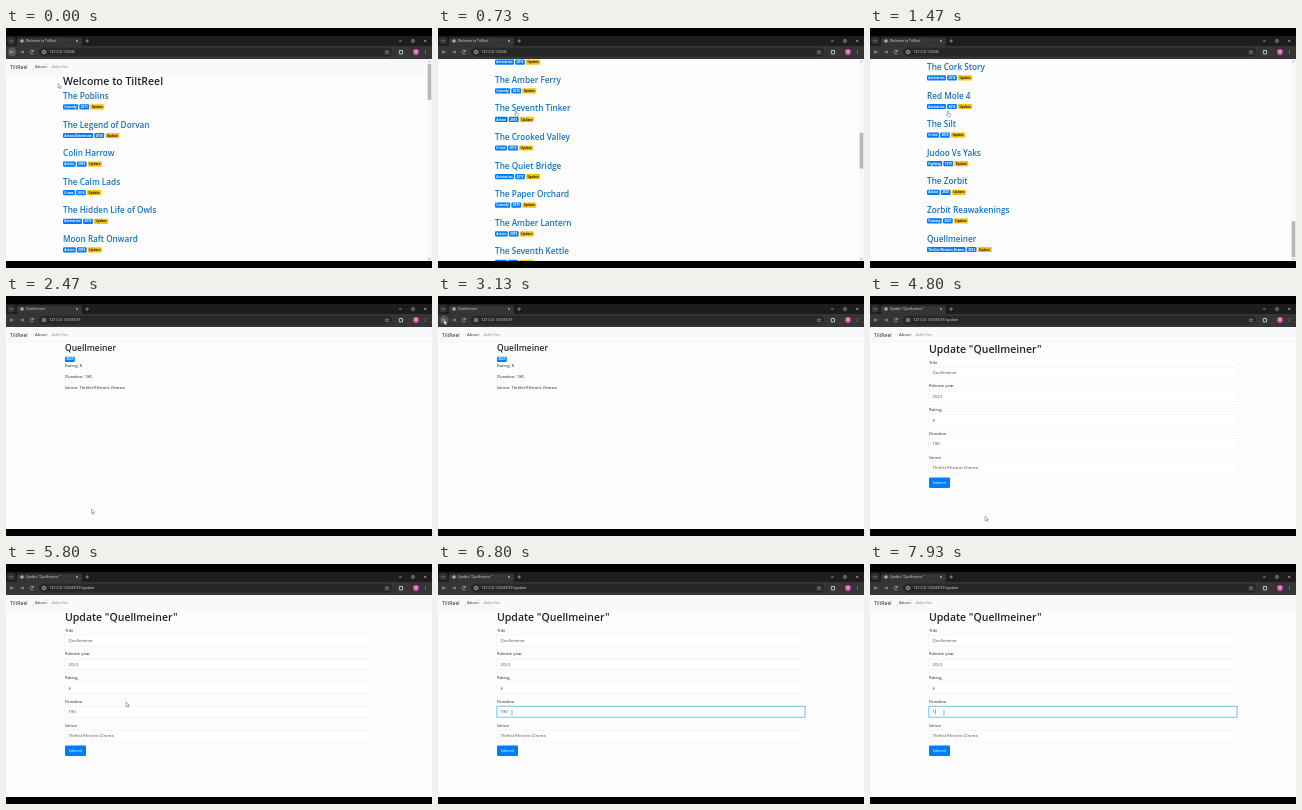
An HTML page with a canvas for the animation above (8000 ms loop, 426x240 px).

```html
<!DOCTYPE html>
<html lang="en">
<head>
<meta charset="utf-8">
<title>Film list</title>
<style>
  html, body { margin: 0; width: 100%; height: 100%; overflow: hidden; background: #000; }
  canvas { display: block; width: 426px; height: 240px; }
</style>
</head>
<body>
<canvas id="stage"></canvas>
<script>
const W = 426, H = 240, LOOP = 8000;
const PAGE_TOP = 31, PAGE_BOTTOM = 233, PITCH = 28.6;
const INK = '#212529', BLUE = '#007bff', LINK = '#1273c4', YELLOW = '#ffc107';
const FONT = '"Open Sans", "Noto Sans", sans-serif';
const SITE = 'TiltReel', FILM = 'Quellmeiner';

const canvas = document.getElementById('stage');
const ctx = canvas.getContext('2d');
const ratio = window.devicePixelRatio || 1;
canvas.width = W * ratio;
canvas.height = H * ratio;

const firstFilms = [
  ['The Poblins', 'Comedy', 2011],
  ['The Legend of Dorvan', 'Action/Adventure', 2016],
  ['Colin Harrow', 'Action', 2016],
  ['The Calm Lads', 'Crime', 2016],
  ['The Hidden Life of Owls', 'Animation', 2016],
  ['Moon Raft Onward', 'Action', 2016]
];
const lastFilms = [
  ['The Cork Story', 'Animation', 2014],
  ['Red Mole 4', 'Animation', 2014],
  ['The Silt', 'Crime', 2014],
  ['Judoo Vs Yaks', 'Fighting', 1979],
  ['The Zorbit', 'Action', 2021],
  ['Zorbit Reawakenings', 'Fantasy', 2021],
  [FILM, 'Thriller/Historic Drama', 2023]
];
const adjectives = ['Quiet', 'Amber', 'Crooked', 'Paper', 'Seventh'];
const nouns = ['Ferry', 'Orchard', 'Tinker', 'Lantern', 'Valley', 'Kettle', 'Bridge'];
const genres = ['Action', 'Comedy', 'Animation', 'Crime'];
const middleFilms = Array.from({ length: 24 }, (_, i) => [
  `The ${adjectives[i * 3 % 5]} ${nouns[i * 2 % 7]}`, genres[i * 7 % 4], 2016 - (i >> 3)
]);
const films = [...firstFilms, ...middleFilms, ...lastFilms];
const MAX_SCROLL = 68 + PITCH * (films.length - 1) - 210.6;

// Cursor stops: time, x, y
const cursorPath = [
  [0, 52, 55.5], [250, 52, 55.5], [700, 77, 83], [1550, 77, 83], [2150, 85.5, 213],
  [2650, 85.5, 213], [3050, 6, 24], [3250, 6, 24], [3750, 94, 140], [3850, 94, 140],
  [4250, 115, 221], [4750, 115, 221], [5600, 120, 138], [5900, 120, 138],
  [6450, 74, 148.5], [LOOP, 74, 148.5]
];

const smooth = (t, a, b) => {
  const p = Math.min(1, Math.max(0, (t - a) / (b - a)));
  return p * p * (3 - 2 * p);
};

function cursorAt(t) {
  const i = cursorPath.findIndex(([end]) => end > t);
  const [t0, x0, y0] = cursorPath[i - 1], [t1, x1, y1] = cursorPath[i];
  const p = smooth(t, t0, t1);
  return [x0 + (x1 - x0) * p, y0 + (y1 - y0) * p];
}

function rect(x, y, w, h, color, radius = 0) {
  ctx.fillStyle = color;
  ctx.beginPath();
  ctx.roundRect(x, y, w, h, radius);
  ctx.fill();
}

function disc(x, y, r, color) {
  rect(x - r, y - r, 2 * r, 2 * r, color, r);
}

function stroke(path, color = '#c8c8c8', width = 0.6) {
  ctx.strokeStyle = color;
  ctx.lineWidth = width;
  ctx.stroke(new Path2D(path));
}

// Text centred on y; returns its width
function text(str, x, y, size, color = INK, weight = 400) {
  ctx.font = `${weight} ${size}px ${FONT}`;
  ctx.fillStyle = color;
  ctx.fillText(str, x, y + size * 0.36);
  return ctx.measureText(str).width;
}

function badge(label, x, y, fill = BLUE, color = '#fff') {
  ctx.font = `700 3.1px ${FONT}`;
  const width = ctx.measureText(label).width + 2.7;
  rect(x, y - 2.6, width, 5.2, fill, 1);
  text(label, x + 1.35, y, 3.1, color, 700);
  return x + width + 1.2;
}

function drawBrowser(title, url, backHover) {
  rect(0, 8, W, 10, '#1d1d1d');
  rect(0, 18, W, 13, '#353533');
  rect(1.5, 9.5, 7.5, 7, '#333', 2);
  stroke('M4 12.3 l1.3 1.3 l1.3 -1.3');
  rect(11, 9.5, 65, 9, '#353533', [2, 2, 0, 0]);
  disc(16, 13, 1.8, '#aaa');
  text(title, 20, 13, 3.3, '#ddd');
  stroke('M70 12 l2 2 m0 -2 l-2 2 M79.5 13 h3.4 m-1.7 -1.7 v3.4');
  stroke('M393 13 h3 M405.8 11.8 h2.4 v2.4 h-2.4 z M418 11.8 l2.4 2.4 m0 -2.4 l-2.4 2.4');

  if (backHover) disc(6, 24, 4.5, '#555553');
  stroke('M8 24 h-4 m1.7 -1.7 l-1.7 1.7 l1.7 1.7');
  stroke('M14 24 h4 m-1.7 -1.7 l1.7 1.7 l-1.7 1.7', '#bbb');
  stroke('M27.4 23 a1.8 1.8 0 1 0 .2 1.8 M27.6 21.8 v1.5 h-1.5');
  rect(33, 19.7, 353, 8.8, '#272726', 4.4);
  disc(38, 24, 2.6, '#444');
  stroke('M36.5 24 a1.5 1.5 0 1 0 3 0 a1.5 1.5 0 1 0 -3 0');
  text(url, 43, 24, 3.8, '#ddd');
  stroke('M381 22 l.6 1.4 1.5 .1 -1.2 1 .4 1.5 -1.3 -.8 -1.3 .8 .4 -1.5 -1.2 -1 1.5 -.1z', '#ccc', 0.4);
  stroke('M393.3 22.5 h3.2 v3.4 h-3.2 z', '#ddd', 0.8);
  disc(410, 24, 2.9, '#d94fb4');
  text('M', 408.6, 24, 3.2, '#fff');
  [22.4, 24, 25.6].forEach(y => disc(419.5, y, 0.45, '#ddd'));
}

function drawNav(y = 39) {
  rect(0, y - 8, W, 16, '#f8f9fa');
  text(SITE, 4, y - 0.2, 5.2);
  text('About', 29, y - 0.2, 4.25, '#333');
  text('Add film', 46, y - 0.2, 4.25, '#8d93a5');
}

function drawList(scroll) {
  drawNav(39 - scroll);
  text('Welcome to ' + SITE, 57, 53.7 - scroll, 10.5, INK, 600);
  films.forEach(([title, genre, year], i) => {
    const y = 68 + i * PITCH - scroll;
    if (y < 10 || y > 250) return;
    text(title, 57, y, 8.2, LINK, 600);
    let x = badge(genre, 57, y + 10.9);
    x = badge(String(year), x, y + 10.9);
    badge('Update', x, y + 10.9, YELLOW, INK);
  });

  const trackTop = 36, track = 193;
  const thumb = track * 202 / (202 + MAX_SCROLL);
  rect(421, PAGE_TOP, 5, 202, '#f8f8f8');
  rect(421.7, trackTop + (track - thumb) * scroll / MAX_SCROLL, 3.6, thumb, '#b8b8b8');
  stroke('M422.4 34.2 l1.1 -1.3 l1.1 1.3 M422.4 230.3 l1.1 1.3 l1.1 -1.3', '#777');
}

function drawDetail() {
  drawNav();
  text(FILM, 59, 52.3, 8.5, INK, 600);
  badge('2023', 59, 63.3);
  text('Rating: 8', 59, 69.7, 4.25);
  text('Duration: 180', 59, 80.8, 4.25);
  text('Genre: Thriller/Historic Drama', 59, 91.9, 4.25);
}

function drawForm(t) {
  drawNav();
  text(`Update "${FILM}"`, 59, 53.7, 10.5, INK, 600);
  const duration = t < 7300 ? '180' : t < 7600 ? '18' : '1';
  const fields = [
    ['Title', FILM], ['Release year', '2023'], ['Rating', '8'],
    ['Duration', duration], ['Genre', 'Thriller/Historic Drama']
  ];
  fields.forEach(([label, value], i) => {
    const y = 66 + i * 23.75;
    const focused = label === 'Duration' && t >= 6500;
    text(label, 59, y, 4.25);
    rect(59, y + 5.3, 308, 10.5, '#fff', 1);
    if (focused) stroke(`M58.6 ${y + 4.9} h308.8 v11.3 h-308.8 z`, '#bfdeff', 1.1);
    stroke(`M59 ${y + 5.3} h308 v10.5 h-308 z`, focused ? '#5aaed8' : '#dfe2e4', focused ? 0.5 : 0.3);
    const width = text(value, 62.5, y + 10.6, 4.25, '#495057');
    if (focused && t >= 7300) rect(62.8 + width, y + 8, 0.4, 5.2, INK);
  });
  rect(59, 181.4, 21, 10.5, BLUE, 1.1);
  text('Submit', 62.4, 186.6, 4.25, '#fff');
}

const cursors = {
  arrow: 'M0 0 v4.6 l1.1 -1 .8 1.7 .8 -.4 -.8 -1.6 h1.5 z',
  hand: 'M.6 .4 q.6 -.6 1 0 v1.9 l2 .5 v1.8 l-.6 1.2 h-1.9 l-1.6 -2.2 .4 -.4 .7 .5 z',
  beam: 'M-.8 -1.8 h1.6 M0 -1.8 v3.8 M-.8 2 h1.6'
};

function drawCursor(t) {
  const [x, y] = cursorAt(t);
  const kind = t > 6350 ? 'beam'
    : (t > 600 && t < 1650) || (t > 2050 && t < 2300) || (t > 4200 && t < 4700) ? 'hand' : 'arrow';
  ctx.save();
  ctx.translate(x, y);
  if (kind !== 'beam') {
    ctx.fillStyle = '#fff';
    ctx.fill(new Path2D(cursors[kind]));
  }
  stroke(cursors[kind], '#444', 0.4);
  ctx.restore();
}

function draw(t) {
  ctx.setTransform(ratio, 0, 0, ratio, 0, 0);
  rect(0, 0, W, H, '#000');
  ctx.save();
  ctx.beginPath();
  ctx.rect(0, PAGE_TOP, W, PAGE_BOTTOM - PAGE_TOP);
  ctx.clip();
  rect(0, PAGE_TOP, W, 202, '#fdfdfd');

  let title = 'Welcome to ' + SITE, path = '';
  if (t >= 2300 && t < 3250) {
    title = FILM;
    path = '/37';
    drawDetail();
  } else if (t >= 4700) {
    title = `Update "${FILM}"`;
    path = '/37/update';
    drawForm(t);
  } else {
    drawList(MAX_SCROLL * smooth(t, 250, 1300));
  }
  ctx.restore();
  drawBrowser(title, '127.0.0.1:5000' + path, t < 250 || (t > 3000 && t < 3900));
  drawCursor(t);
}

function tick(now) {
  draw(now % LOOP);
  requestAnimationFrame(tick);
}
requestAnimationFrame(tick);
</script>
</body>
</html>
```
